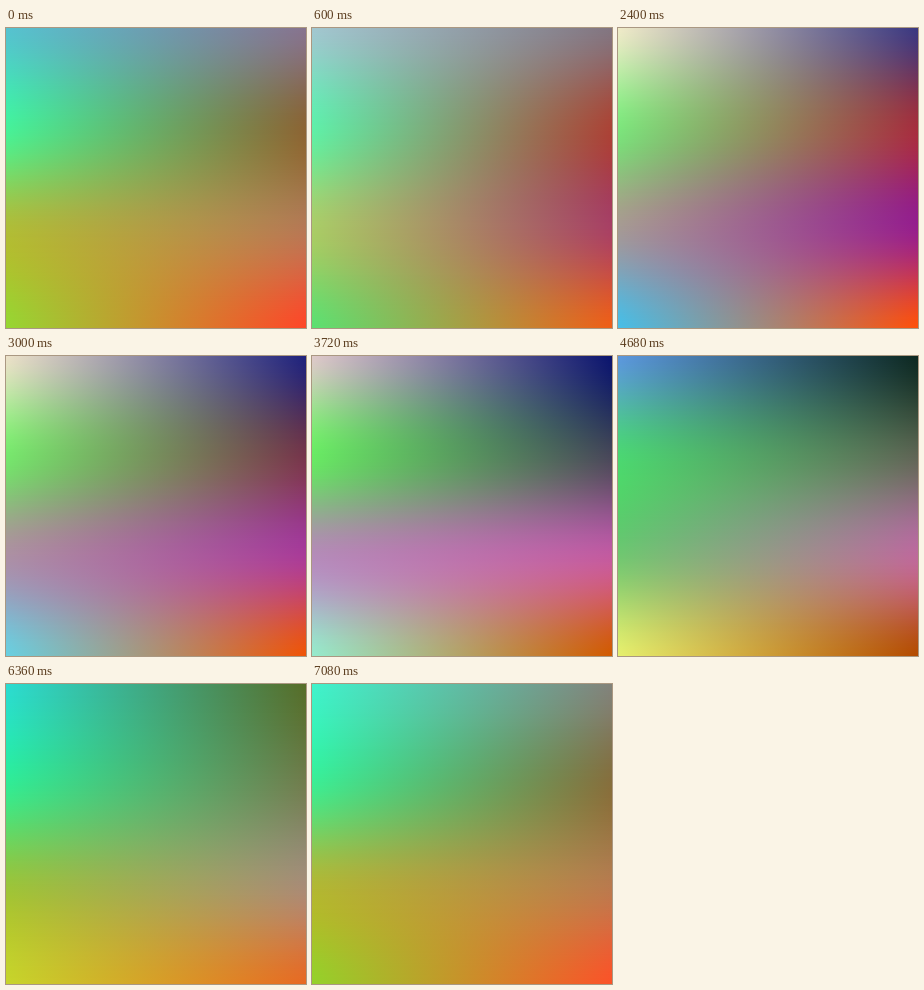
An HTML page with a canvas for the animation above (7200 ms loop, 300 by 300 pixels).

```html
<!DOCTYPE html>
<html>
<head>
<meta charset="utf-8">
<style>
html, body { margin: 0; width: 100%; height: 100%; overflow: hidden; }
canvas { display: block; }
</style>
</head>
<body>
<canvas id="stage" width="300" height="300"></canvas>
<script>
const SIZE = 300, LOOP = 7200, STEP = 120;
const ctx = document.getElementById('stage').getContext('2d');
const times = [0, 1320, 2400, 3720, 4680, 5640, 7080];

// Each line follows one control colour through the key times, top row to bottom row.
const left = [
  '#55c3d0 #dcd2d0 #f0ebc8 #dfcaca #5c98de #23b9d9 #3ff3cc',
  '#46f29a #73ebb2 #7de67d #69eb64 #4bd773 #2deb96 #3cee94',
  '#afbe37 #a5d796 #a59b94 #b48cb9 #70c870 #7dd246 #b0b934',
  '#96d732 #0ee6b9 #46bee8 #96ebcd #e6f06e #fadc2d #94d22a'
];
const right = [
  '#87738e #74786e #3a3780 #0a146e #0c2820 #2d4b00 #82827a',
  '#8c6434 #c32d3a #a52d3e #48465a #5f6455 #648255 #876e3c',
  '#b67854 #9b0073 #961e8c #c35a9f #be699b #96969f #b87a4e',
  '#ff4628 #dc7d00 #ff500a #d25a00 #b44b00 #d27319 #fc5228'
];

const parse = line => line.split(' ').map(hex =>
  [1, 3, 5].map(i => parseInt(hex.slice(i, i + 2), 16)));
const leftKeys = left.map(parse), rightKeys = right.map(parse);

function hermite(a, b, slopeA, slopeB, u) {
  const u2 = u * u, u3 = u2 * u;
  return a * (2 * u3 - 3 * u2 + 1) + b * (3 * u2 - 2 * u3) +
    slopeA * (u3 - 2 * u2 + u) + slopeB * (u3 - u2);
}

// Harmonic mean keeps the curve from overshooting its keys.
const gentleSlope = (p, q) => p * q > 0 ? 2 * p * q / (p + q) : 0;

function colourAt(keys, t) {
  const n = times.length;
  const time = i => times[(i + n) % n] + LOOP * Math.floor(i / n);
  const value = (i, c) => keys[(i + n) % n][c];
  let k = n - 1;
  while (times[k] > t) k--;
  const span = time(k + 1) - time(k);
  return [0, 1, 2].map(c => {
    const rate = i => (value(i + 1, c) - value(i, c)) / (time(i + 1) - time(i));
    return hermite(value(k, c), value(k + 1, c),
      gentleSlope(rate(k - 1), rate(k)) * span,
      gentleSlope(rate(k), rate(k + 1)) * span, (t - time(k)) / span);
  });
}

function edgeColour(rows, y) {
  const v = y / SIZE * (rows.length - 1), i = Math.floor(v);
  const row = j => rows[Math.max(0, Math.min(rows.length - 1, j))];
  return [0, 1, 2].map(c => hermite(row(i)[c], row(i + 1)[c],
    (row(i + 1)[c] - row(i - 1)[c]) / 2,
    (row(i + 2)[c] - row(i)[c]) / 2, v - i));
}

const css = rgb => `rgb(${rgb.map(x => Math.round(Math.max(0, Math.min(255, x))))})`;

function draw(t) {
  const l = leftKeys.map(keys => colourAt(keys, t));
  const r = rightKeys.map(keys => colourAt(keys, t));
  for (let y = 0; y < SIZE; y++) {
    const g = ctx.createLinearGradient(0, 0, SIZE, 0);
    g.addColorStop(0, css(edgeColour(l, y + 0.5)));
    g.addColorStop(1, css(edgeColour(r, y + 0.5)));
    ctx.fillStyle = g;
    ctx.fillRect(0, y, SIZE, 1);
  }
}

const start = performance.now();
let shown = -1;
function tick() {
  const t = Math.floor((performance.now() - start) % LOOP / STEP) * STEP;
  if (t !== shown) draw(shown = t);
  requestAnimationFrame(tick);
}
tick();
</script>
</body>
</html>
```
